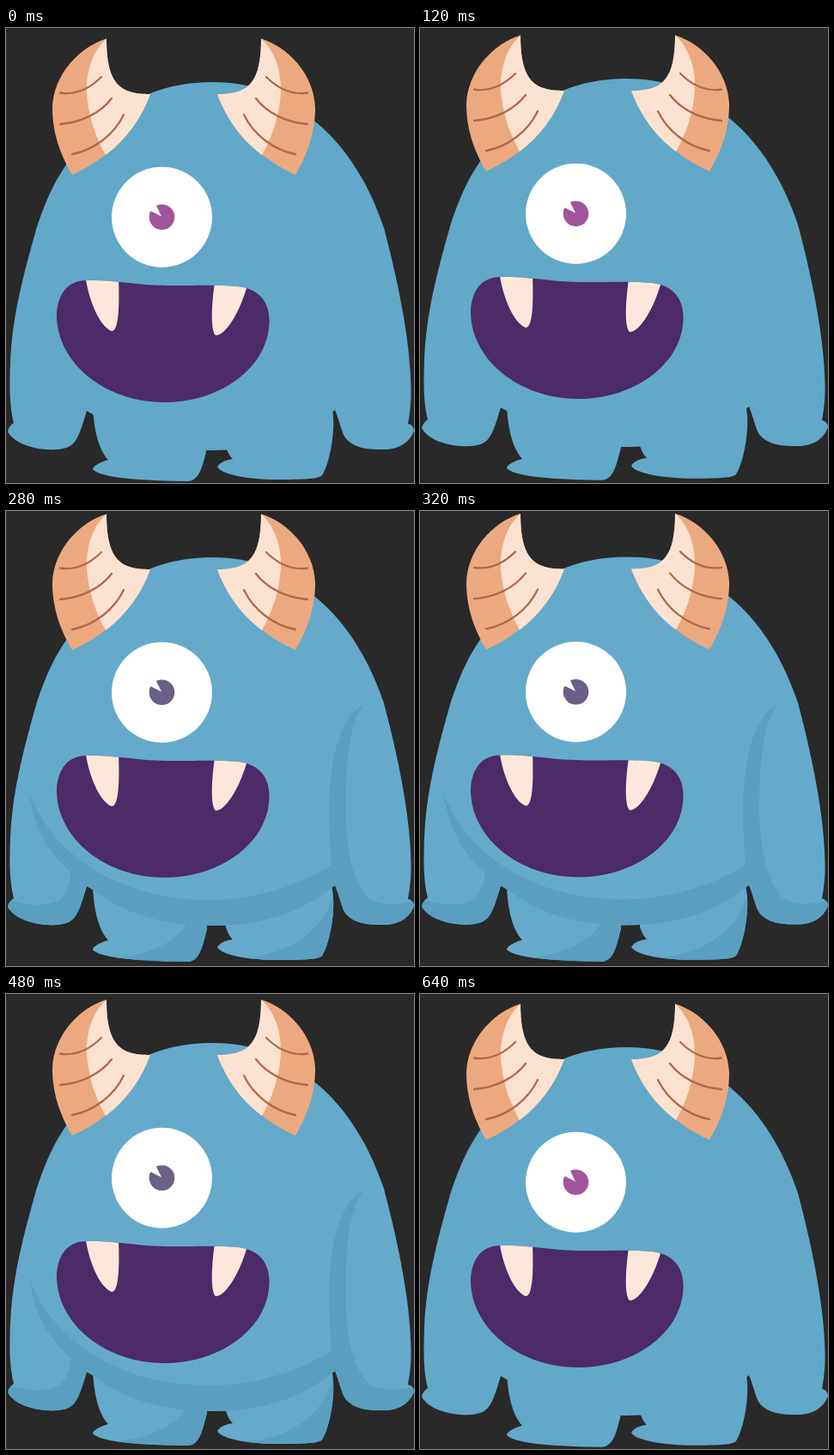
Recreate the animation shown at these times as an HTML page. Size 475 by 530 pixels, loop 0.68 s.

```html
<!DOCTYPE html>
<html lang="en">
<head>
<meta charset="utf-8">
<title>Bouncing monster</title>
<style>
  html, body { margin: 0; width: 100%; height: 100%; overflow: hidden; background: #292929; }
  svg { display: block; width: 100vw; height: 100vh; }
  #monster { fill: #62a8c8; }
  #monster.shaded { fill: #65aacb; }
  .shade { fill: #5a9fbf; visibility: hidden; }
  .shaded .shade { visibility: visible; }
  .ridge { fill: none; stroke: #b1694c; stroke-width: 2.3; stroke-linecap: round; }
</style>
</head>
<body>
<svg viewBox="0 0 475 530" preserveAspectRatio="none">
  <defs>
    <path id="torso" d="M240 63 C300 63 330 85 360 109 C398 140 424 185 440 233
      C459 305 471 370 471.5 420 C472 440 469 455 468 461 C473 462 475 466 475 469
      C470 484 455 491 440 491 C415 492 399 486 393 474 C389 464 387 454 383 445
      L379 448 C340 480 290 492 240 492 C185 492 140 480 101 450 L94 446
      C89 462 86 474 80 482 C74 490 62 492 48 491 C28 490 8 482 2 470
      C3 465 6 462 9 460 C4 440 4 420 5 390 C7 340 18 295 35 235
      C48 195 60 172 77 150 C100 118 125 95 166 77 C188 68 212 63 240 63Z"/>
    <path id="legShape" d="M101 440 C102 465 107 490 119 503 C108 506 101 511 101 514
      C108 522 140 527 210 528 C226 529 229 508 234 490 L234 440Z
      M379 440 C385 462 378 505 368 521 C364 526 340 526 310 526
      C275 525 250 519 246 511 C250 505 257 503 264 502 C259 497 258 493 256 488 L256 440Z"/>
    <path id="mouthShape" d="M93 294 C130 293 150 300 195 300 C230 300 250 299 270 301
      C297 304 307 322 306.5 342 C306 395 250 436 185 436 C115 436 59 390 59 334 C60 310 72 294 93 294Z"/>
    <clipPath id="inTorso"><use href="#torso"/></clipPath>
    <clipPath id="inLegs"><use href="#legShape"/></clipPath>
    <clipPath id="inMouth"><use href="#mouthShape"/></clipPath>
    <g id="horn">
      <path fill="#eca97f" d="M117 12.5 C85 22 55 55 54 93 C54 125 65 150 77 171
        C92 164 104 157 115 148 C140 130 158 105 168 77 C134 77 117 67 117 12.5Z"/>
      <path fill="#fbe2d0" d="M117 12.5 C95 32 92 65 95 85 C98 110 106 130 116 148
        C140 130 158 105 168 77 C134 77 117 67 117 12.5Z"/>
      <path class="ridge" d="M63 75.5 C80 78 97 71 111 57 M63 112 C88 110 110 99 123 82 M77 147 C103 142 126 124 137 101"/>
    </g>
  </defs>

  <rect width="475" height="530" fill="#292929"/>
  <g id="monster">
    <g id="legs">
      <use href="#legShape"/>
      <path class="shade" clip-path="url(#inLegs)" d="M215 470 C211 500 170 522 114 525 L120 532 L236 532 L236 470Z
        M382 448 C370 490 335 518 278 524 L280 532 L390 532 L390 448Z"/>
    </g>
    <g id="body">
      <use href="#torso"/>
      <g class="shade" clip-path="url(#inTorso)">
        <path d="M27 337 C50 400 120 461 235 462 C300 462 350 440 380 421 L384 450 L380 500 L100 500 L94 446 L76 430 C50 408 33 380 27 337Z"/>
        <path d="M416 235 C385 250 376 310 376 360 C376 385 378 405 379 421 L381 500 L478 500 L478 462
          C455 469 437 469 423 461 C402 440 396 400 395 359 C395 309 398 259 416 235Z"/>
        <path d="M76 430 C72 452 66 462 56 465 C40 470 20 468 0 461 L0 500 L90 500 L96 446Z"/>
      </g>
      <use href="#horn"/>
      <use href="#horn" transform="translate(414 0) scale(-1 1)"/>
      <circle cx="181.5" cy="220.3" r="58.5" fill="#fff"/>
      <circle id="pupil" cx="181.5" cy="220.3" r="14.8"/>
      <path fill="#fff" d="M181 219.5 L173 203 L164 211Z"/>
      <use href="#mouthShape" fill="#4d2a68"/>
      <path fill="#fce8da" clip-path="url(#inMouth)" d="M92.5 290 C96 315 108 347 123 353 C132 353 132 320 131 290Z
        M243 296 C239 325 238 352 244 358 C254 359 271 335 281 300Z"/>
    </g>
  </g>
</svg>
<script>
  const LOOP = 680, STEP = 40;
  const lift = [0, 1, 2.5, 4, 5.6, 7, 8.2, 9, 9.6, 9.5, 9, 7.6, 6, 4.8, 3.6, 2.2, 1];
  const [monster, legs, body, pupil] =
    ['monster', 'legs', 'body', 'pupil'].map(id => document.getElementById(id));
  const within = (t, from, to) => t >= from && t < to;
  const rise = (el, y) => el.setAttribute('transform', `translate(0 ${-y})`);

  function draw(now) {
    const t = now % LOOP;
    const y = lift[Math.floor(t / STEP)];
    rise(body, y);
    rise(legs, y / 3);
    monster.classList.toggle('shaded', within(t, 240, 560));
    const dull = within(t, 240, 360) || within(t, 440, 560);
    pupil.setAttribute('fill', dull ? '#6a5f87' : '#a2549a');
  }

  const start = performance.now();
  function tick() {
    draw(performance.now() - start);
    requestAnimationFrame(tick);
  }
  tick();
</script>
</body>
</html>
```
